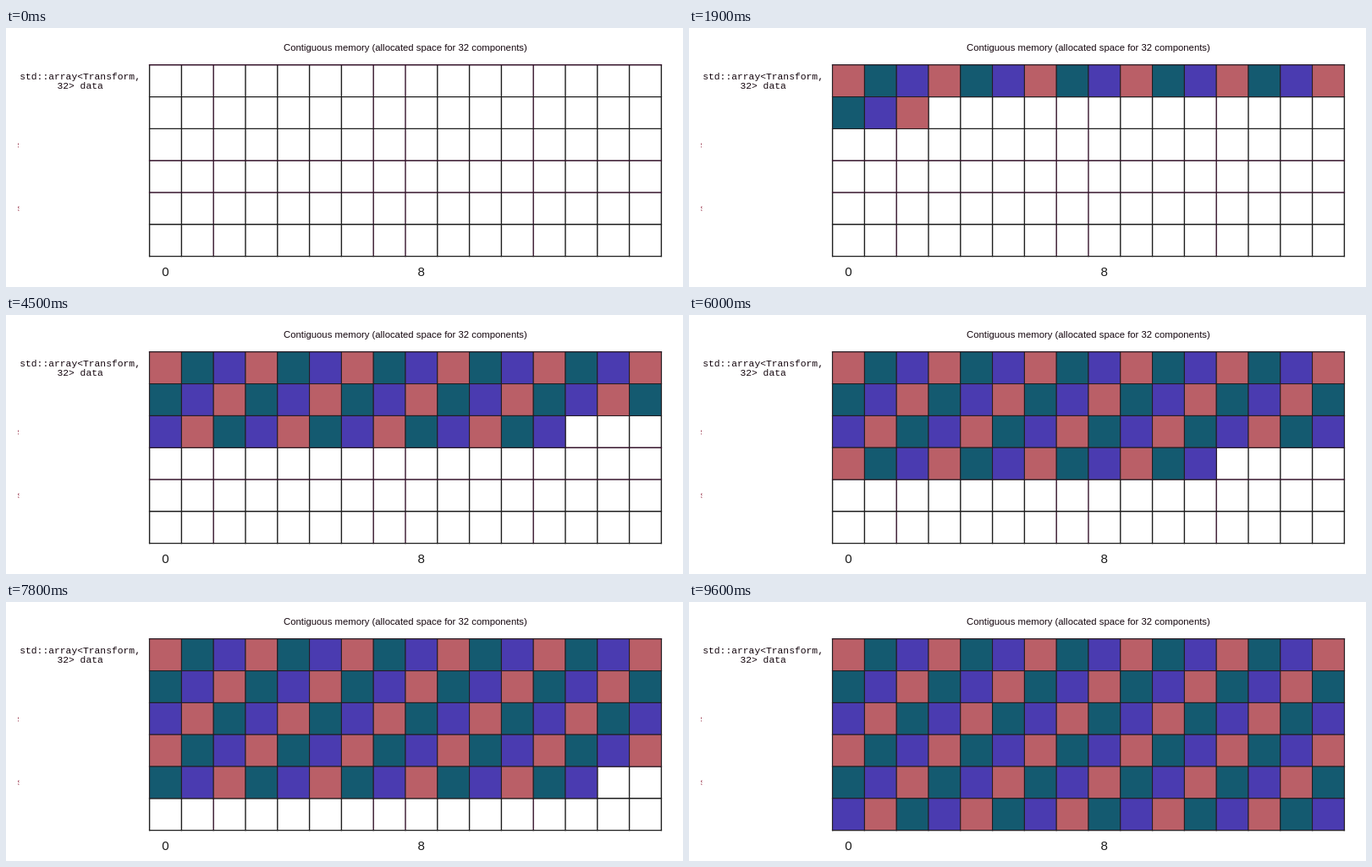
An HTML page that plays this animation: 800x307 px, repeating every 9700 ms.

```html
<!DOCTYPE html>
<html lang="en">
<head>
<meta charset="utf-8">
<title>Contiguous memory</title>
<style>
  html, body { margin: 0; width: 100%; height: 100%; overflow: hidden; background: #fff; }
  svg { display: block; width: 800px; height: 307px; }
  text { font: 11.34px "Liberation Sans", Arial, sans-serif; text-anchor: middle; fill: #14060e; }
  .mono text { font-family: "Liberation Mono", "Courier New", monospace; }
  .mono .cut { text-anchor: start; fill: #8c1a34; }
  .index text { font-size: 15.12px; fill: #1a1a1a; }
  #grid { stroke-width: 1.4; stroke-linecap: square; }
  #cells { stroke: #231c20; stroke-width: 1; }
</style>
</head>
<body>
<svg viewBox="0 0 800 307">
  <clipPath id="sliver1"><rect x="13" y="130" width="2" height="18"/></clipPath>
  <clipPath id="sliver2"><rect x="13" y="205" width="2.4" height="18"/></clipPath>
  <text x="471.9" y="27.2">Contiguous memory (allocated space for 32 components)</text>
  <g class="mono">
    <text x="87.6" y="60.6">std::array&lt;Transform,</text>
    <text x="87.6" y="72.4">32&gt; data</text>
    <text class="cut" x="13" y="142" clip-path="url(#sliver1)">s</text>
    <text class="cut" x="13" y="217.4" clip-path="url(#sliver2)">s</text>
  </g>
  <g class="index">
    <text x="188.4" y="294.3">0</text>
    <text x="490.8" y="294.3">8</text>
  </g>
  <g id="grid"></g>
  <g id="cells"></g>
</svg>
<script>
  const COLS = 16, ROWS = 6, SIZE = 37.8, LEFT = 169.6, TOP = 43.8;
  const STEP = 100, LOOP = 9700;
  const COLORS = ['#ba5f67', '#145a70', '#4a3bb0'];
  const INK = '#1e1e1e', TINT = '#35132b';
  const grid = document.getElementById('grid');
  const group = document.getElementById('cells');

  function add(parent, tag, attrs) {
    const el = document.createElementNS('http://www.w3.org/2000/svg', tag);
    for (const key in attrs) el.setAttribute(key, attrs[key]);
    return parent.appendChild(el);
  }

  const right = LEFT + COLS * SIZE, bottom = TOP + ROWS * SIZE;
  for (let c = 0; c <= COLS; c++) {
    const x = LEFT + c * SIZE;
    add(grid, 'line', { x1: x, y1: TOP, x2: x, y2: bottom, stroke: [2, 7, 8, 12].includes(c) ? TINT : INK });
  }
  for (let r = 0; r <= ROWS; r++) {
    const y = TOP + r * SIZE;
    add(grid, 'line', { x1: LEFT, y1: y, x2: right, y2: y, stroke: [0, 3, 4].includes(r) ? TINT : INK });
  }

  const cells = Array.from({ length: COLS * ROWS }, (_, i) => add(group, 'rect', {
    x: LEFT + (i % COLS) * SIZE,
    y: TOP + Math.floor(i / COLS) * SIZE,
    width: SIZE, height: SIZE,
    fill: COLORS[i % 3], visibility: 'hidden'
  }));

  // One more component is stored every step.
  let shown = -1;
  const start = performance.now();
  function draw(now) {
    const count = Math.floor(Math.max(0, now - start) % LOOP / STEP);
    if (count !== shown) {
      cells.forEach((cell, i) => cell.setAttribute('visibility', i < count ? 'visible' : 'hidden'));
      shown = count;
    }
    requestAnimationFrame(draw);
  }
  draw(start);
</script>
</body>
</html>
```
